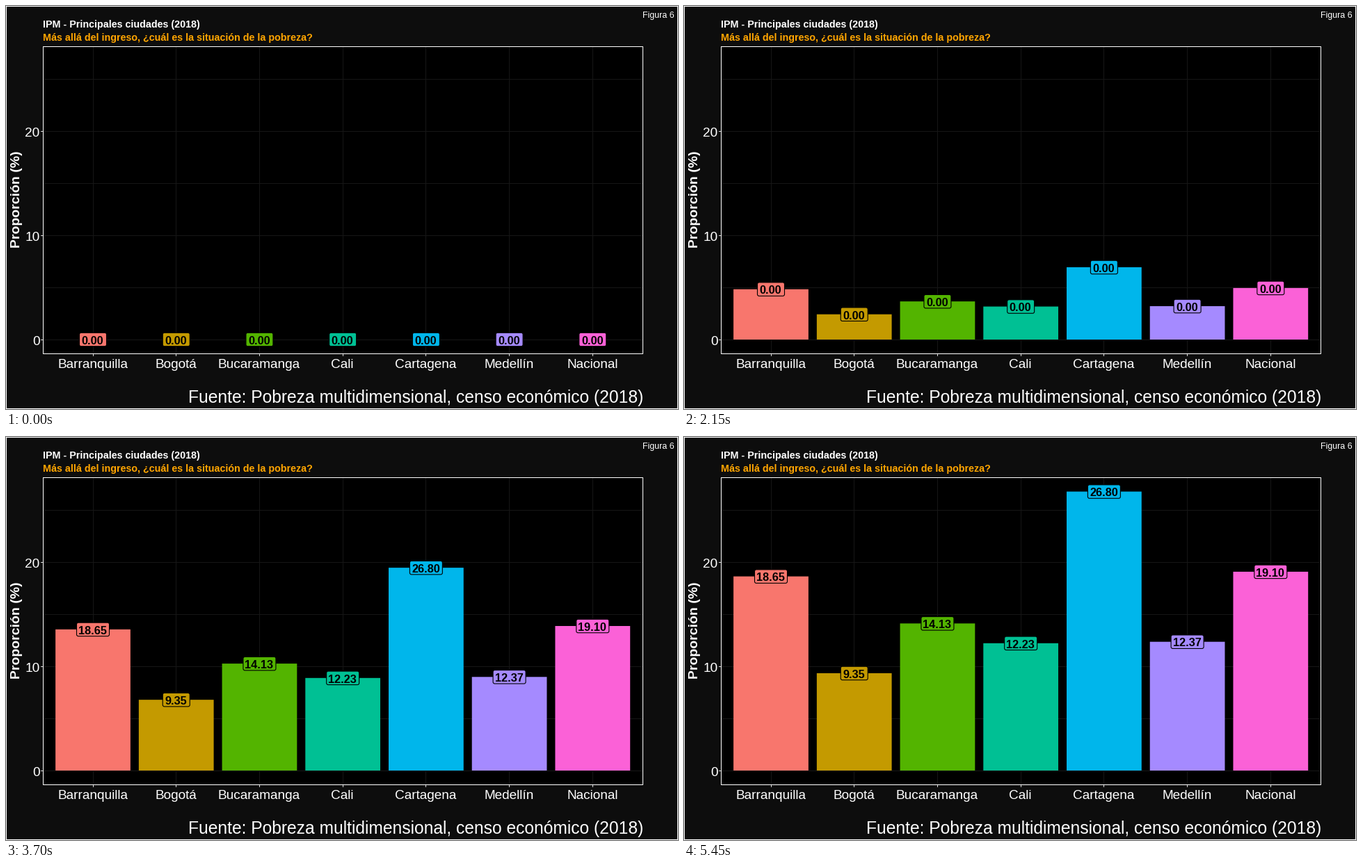
Write a matplotlib script that moves like this. It is 966x580 px and loops after 8 s.

```python
import math

import matplotlib.pyplot as plt
from matplotlib.animation import FuncAnimation
from matplotlib.patches import FancyBboxPatch, Rectangle

W, H, DPI = 966, 580, 100
FRAME_MS, LOOP_MS = 50, 8000
HOLD, GROW = 9, 100  # still frames before the bars rise, frames of growth

LEFT, TOP, RIGHT, BOTTOM = 53.5, 58.5, 915.5, 500.5
Y0, UNIT = 480, 14.98  # zero line and pixels per percent
X0, STEP = 125, 119.72  # first bar centre and bar spacing
BAR_W = 0.9 * STEP

CITIES = [
    ("Barranquilla", 18.65, "#F8766D"),
    ("Bogotá", 9.35, "#C49A00"),
    ("Bucaramanga", 14.13, "#53B400"),
    ("Cali", 12.23, "#00C094"),
    ("Cartagena", 26.80, "#00B6EB"),
    ("Medellín", 12.37, "#A58AFF"),
    ("Nacional", 19.10, "#FB61D7"),
]

plt.rcParams["font.family"] = "Liberation Sans"
fig = plt.figure(figsize=(W / 100, H / 100), dpi=DPI)
ax = fig.add_axes([0, 0, 1, 1])
ax.set_xlim(0, W)
ax.set_ylim(H, 0)
ax.axis("off")


def px(n):
    return n * 72 / DPI


def text(x, y, s, size, color="white", **kw):
    kw.setdefault("va", "baseline")
    return ax.text(x, y, s, fontsize=px(size), color=color, **kw)


def line(xs, ys, color):
    ax.plot(xs, ys, color=color, lw=px(1), zorder=1, snap=False,
            solid_capstyle="butt")


def frame_box(x0, y0, x1, y1, fill, z):
    ax.add_patch(Rectangle((x0, y0), x1 - x0, y1 - y0, fc=fill, ec="white",
                           lw=px(1), zorder=z, snap=False, joinstyle="miter"))


def centre(v):
    """Middle of the pixel that holds v, for crisp one-pixel lines."""
    return math.floor(v) + 0.5


def draw_panel():
    frame_box(0.5, 0.5, W - 0.5, H - 0.5, "#0D0D0D", 0)
    frame_box(LEFT, TOP, RIGHT, BOTTOM, "black", 0.5)
    for v in range(0, 30, 5):
        y = centre(Y0 - v * UNIT)
        line([LEFT, RIGHT], [y, y], "#161616")
        if v % 10 == 0:
            line([LEFT - 3.5, LEFT], [y, y], "#D9D9D9")
            text(48.5, y + 8, str(v), 19, ha="right")
    for i, (name, _, _) in enumerate(CITIES):
        x = X0 + i * STEP
        line([centre(x)] * 2, [TOP, BOTTOM], "#161616")
        line([centre(x)] * 2, [BOTTOM, BOTTOM + 3.5], "#D9D9D9")
        text(x - 0.5, 521, name, 19, ha="center")
    frame_box(LEFT, TOP, RIGHT, BOTTOM, "none", 3)


def draw_titles():
    text(53, 31, "IPM - Principales ciudades (2018)", 14.3, weight="bold")
    text(53, 50, "Más allá del ingreso, ¿cuál es la situación de la pobreza?",
         14.3, "#FFA500", weight="bold")
    text(960.5, 17, "Figura 6", 12.4, ha="right")
    text(916, 571, "Fuente: Pobreza multidimensional, censo económico (2018)",
         24.65, ha="right")
    text(16, 278.5, "Proporción (%)", 19.5, weight="bold", rotation=90,
         ha="center", va="center")


class Bar:
    def __init__(self, i, value, color):
        self.x, self.value = X0 + i * STEP, value
        self.rect = Rectangle((self.x - BAR_W / 2, Y0), BAR_W, 0, fc=color,
                              lw=0, snap=False, zorder=2)
        self.tag = FancyBboxPatch((0, 0), 1, 1, fc=color, ec="black",
                                  lw=px(1.1), zorder=4, snap=False,
                                  boxstyle="round,pad=0,rounding_size=2.5")
        ax.add_patch(self.rect)
        ax.add_patch(self.tag)
        self.label = text(self.x - 0.5, 0, "", 16.2, "black", weight="bold",
                          ha="center", zorder=5)

    def update(self, p):
        y = Y0 - p * self.value * UNIT
        self.rect.set_y(y)
        self.rect.set_height(Y0 - y)
        s = f"{self.value if p >= 0.5 else 0:.2f}"
        w = 8 * len(s) + 7
        self.tag.set_bounds(self.x - w / 2, y - 9.75, w, 19.5)
        self.label.set_text(s)
        self.label.set_y(y + 6.8)


draw_panel()
draw_titles()
bars = [Bar(i, value, color) for i, (_, value, color) in enumerate(CITIES)]


def update(n):
    t = min(max(n - HOLD, 0), GROW) / GROW
    p = 0.5 * (1 - math.cos(math.pi * t))
    for bar in bars:
        bar.update(p)
    return []


anim = FuncAnimation(fig, update, frames=LOOP_MS // FRAME_MS,
                     interval=FRAME_MS, repeat=True, repeat_delay=0)
plt.show()
```
